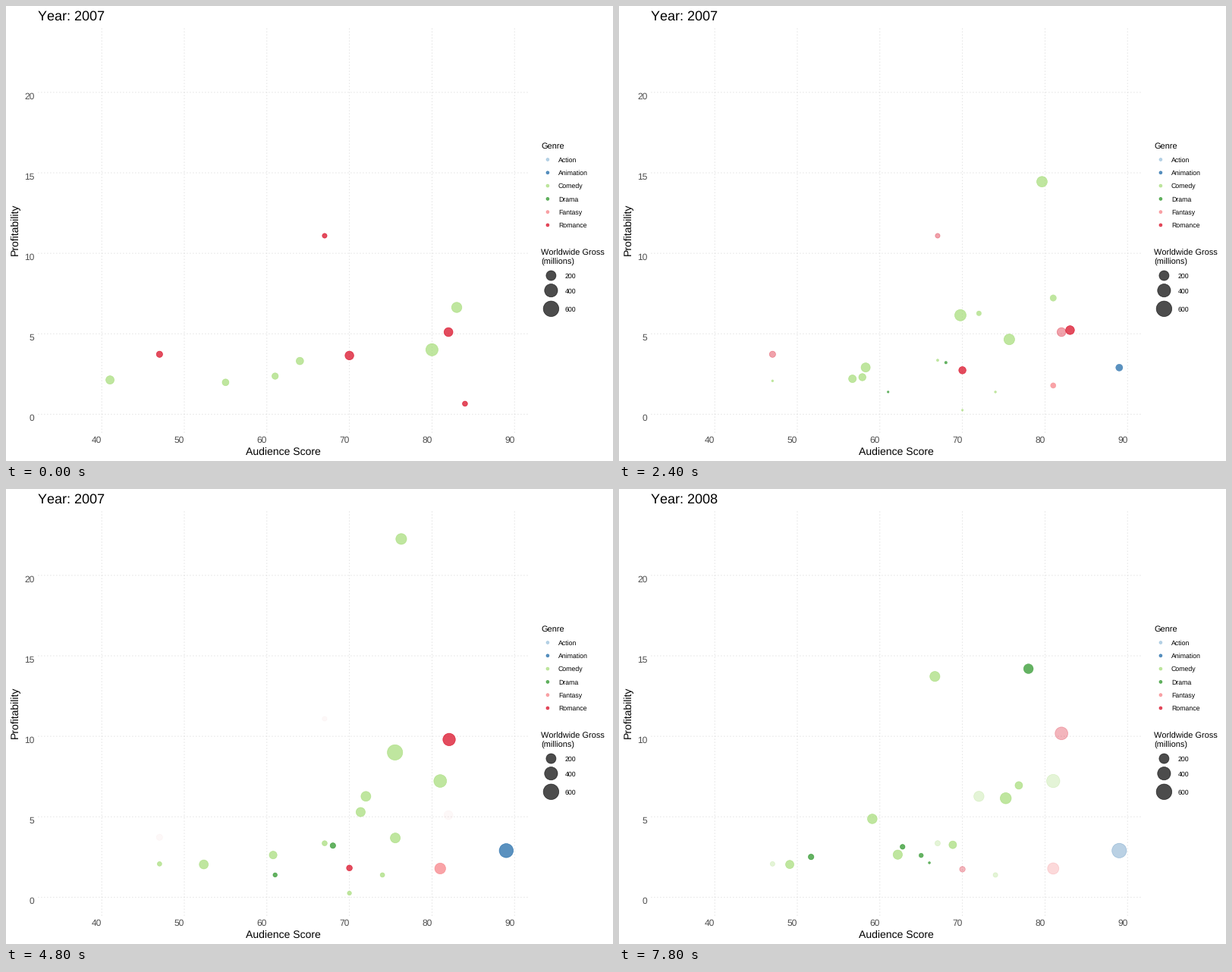
These frames come from a looping animation (800x600 px, 8 s). A matplotlib script:

```python
import math

import matplotlib.pyplot as plt
from matplotlib.animation import FuncAnimation

plt.rcParams["font.family"] = "Liberation Sans"
plt.rcParams["text.hinting"] = "none"
plt.rcParams["text.kerning_factor"] = 10  # large enough to switch kerning off

W, H, DPI = 800, 600, 100
PT = 72 / DPI  # points per pixel
FRAMES, INTERVAL = 40, 200
KEYS = (0, 25, 49)  # frames at which each year's data is reached
FIRST_YEAR = 2007
LEFT, RIGHT, TOP, BOTTOM = 42.4, 688.8, 27.8, 562.6  # panel edges
ALPHA = 0.7
STROKE = 0.709
MAX_GROSS = 709.82

COLORS = {
    "Action": "#98c0dc",
    "Animation": "#1463a5",
    "Comedy": "#a4dc76",
    "Drama": "#239220",
    "Fantasy": "#f77d82",
    "Romance": "#d8001a",
}

# genre, then (score, profitability, gross) for each year; None = absent
TRACKS = [
    ("Comedy", (83, 6.636, 219), (76, 22.913, 252), (60, 7.154, 178.8)),
    ("Comedy", (64, 3.307, 92.6), (76, 9.234, 609.5), (47, 1.751, 32.4)),
    ("Comedy", (80, 4.006, 340.5), (71, 5.344, 160.3), (81, 8.096, 60.7)),
    ("Comedy", (41, 2.129, 127.8), (77, 3.747, 206.1), (74, 7.868, 314.7)),
    ("Comedy", (55, 1.98, 69.3), (61, 2.649, 106), (63, 2.642, 224.6)),
    ("Comedy", (61, 2.368, 59.2), (52, 2.023, 161.8), (47, 2.044, 102.2)),
    ("Comedy", None, (70, 0.253, 15.2), (68, 5.403, 205.3)),
    ("Comedy", None, (81, 7.222, 415.3), None),
    ("Comedy", None, (72, 6.268, 219.4), None),
    ("Comedy", None, (67, 3.353, 33.5), None),
    ("Comedy", None, (47, 2.071, 20.7), None),
    ("Comedy", None, (74, 1.383, 20.7), None),
    ("Animation", None, (89, 2.896, 521.3), None),
    ("Drama", None, (61, 1.384, 16.6), (64, 4.383, 30.7)),
    ("Drama", None, (68, 3.208, 43.3), (40, 2.004, 36.1)),
    ("Drama", None, None, (78, 14.196, 709.8)),
    ("Drama", None, None, (65, 2.598, 101.3)),
    ("Drama", None, None, (66, 2.14, 10.7)),
    ("Fantasy", None, (81, 1.784, 285.4), None),
    ("Romance", (70, 3.647, 145.9), (70, 1.74, 41), None),
    ("Romance", (84, 0.653, 29.4), (82, 10.18, 376.7), None),
    ("Romance", (67, 11.09, 22.2), None, None),
    ("Romance", (82, 5.103, 153.1), None, None),
    ("Romance", (47, 3.724, 55.9), None, None),
]


def px(score):
    return 126.2 + (score - 40) * 10.88


def py(profit):
    return 538.3 - profit * 21.22


def fill_width(size):
    return 2.134 * size + STROKE


def diameter(gross):
    return fill_width(1 + 9 * math.sqrt(gross / MAX_GROSS))


def rgba(color, alpha=ALPHA):
    return tuple(int(color[i:i + 2], 16) / 255 for i in (1, 3, 5)) + (alpha,)


def mix(a, b, t):
    return a + (b - a) * t


def dots(x, ys, widths, colors):
    ax.scatter([x] * len(ys), ys, s=[(w * PT) ** 2 for w in widths],
               facecolors=colors, edgecolors=colors, linewidths=STROKE * PT,
               zorder=3)


def label(x, y, text, size, color="black", **kw):
    return ax.text(x, y, text, fontsize=size * PT, color=color, **kw)


fig = plt.figure(figsize=(W / DPI, H / DPI), dpi=DPI, facecolor="white")
ax = fig.add_axes([0, 0, 1, 1])
ax.set_xlim(0, W)
ax.set_ylim(H, 0)
ax.axis("off")

# grid and tick labels
grid = dict(color="#cccccc", lw=0.8 * PT, ls=(0, (1.25, 3.75)),
            dash_capstyle="butt", snap=False, zorder=1)
for score in range(40, 91, 10):
    ax.plot([px(score)] * 2, [BOTTOM, TOP], **grid)
    label(px(score) + 0.3, 576, str(score), 12, "#4d4d4d", ha="right")
for profit in range(0, 21, 5):
    ax.plot([LEFT, RIGHT], [py(profit)] * 2, **grid)
    label(37.4, py(profit) + 8.6, str(profit), 12, "#4d4d4d", ha="right")

title = label(LEFT, 19, "", 18)
label(365.5, 592, "Audience Score", 14, ha="center")
label(16, 295, "Profitability", 14, rotation=90, rotation_mode="anchor",
      ha="center", va="baseline")

# legends
label(705.2, 188, "Genre", 11)
key_ys = [202.5 + 17.28 * i for i in range(len(COLORS))]
dots(713.9, key_ys, [fill_width(1.5)] * len(COLORS),
     [rgba(c) for c in COLORS.values()])
for name, y in zip(COLORS, key_ys):
    label(728, y + 3.3, name, 8.8)

label(705.2, 329, "Worldwide Gross", 11)
label(705.2, 341, "(millions)", 11)
sizes = {200: 355.5, 400: 375.15, 600: 399.3}
dots(718.4, list(sizes.values()), [diameter(g) for g in sizes],
     [rgba("#000000")] * len(sizes))
for gross, y in sizes.items():
    label(737, y + 3.3, str(gross), 8.8)

bubbles = ax.scatter([], [], zorder=3)


def update(frame):
    seg = 0 if frame < KEYS[1] else 1
    t = (frame - KEYS[seg]) / (KEYS[seg + 1] - KEYS[seg])
    pos, areas, colors, strokes = [], [], [], []
    for genre, *states in TRACKS:
        a, b = states[seg], states[seg + 1]
        if not (a or b) or (a is None and t == 0):
            continue
        grow = 1 if a else t
        fade = 1 if b else 1 - t
        a, b = a or b, b or a
        width = mix(diameter(a[2]), diameter(b[2]), t) * grow
        pos.append((px(mix(a[0], b[0], t)), py(mix(a[1], b[1], t))))
        areas.append((width * PT) ** 2)
        colors.append(rgba(COLORS[genre], ALPHA * fade))
        strokes.append(STROKE * PT * grow)
    bubbles.set_offsets(pos)
    bubbles.set_sizes(areas)
    bubbles.set_facecolors(colors)
    bubbles.set_edgecolors(colors)
    bubbles.set_linewidths(strokes)
    title.set_text(f"Year: {FIRST_YEAR + seg}")
    return bubbles, title


anim = FuncAnimation(fig, update, frames=FRAMES, interval=INTERVAL,
                     init_func=lambda: update(0), repeat=True, repeat_delay=0)
plt.show()
```
